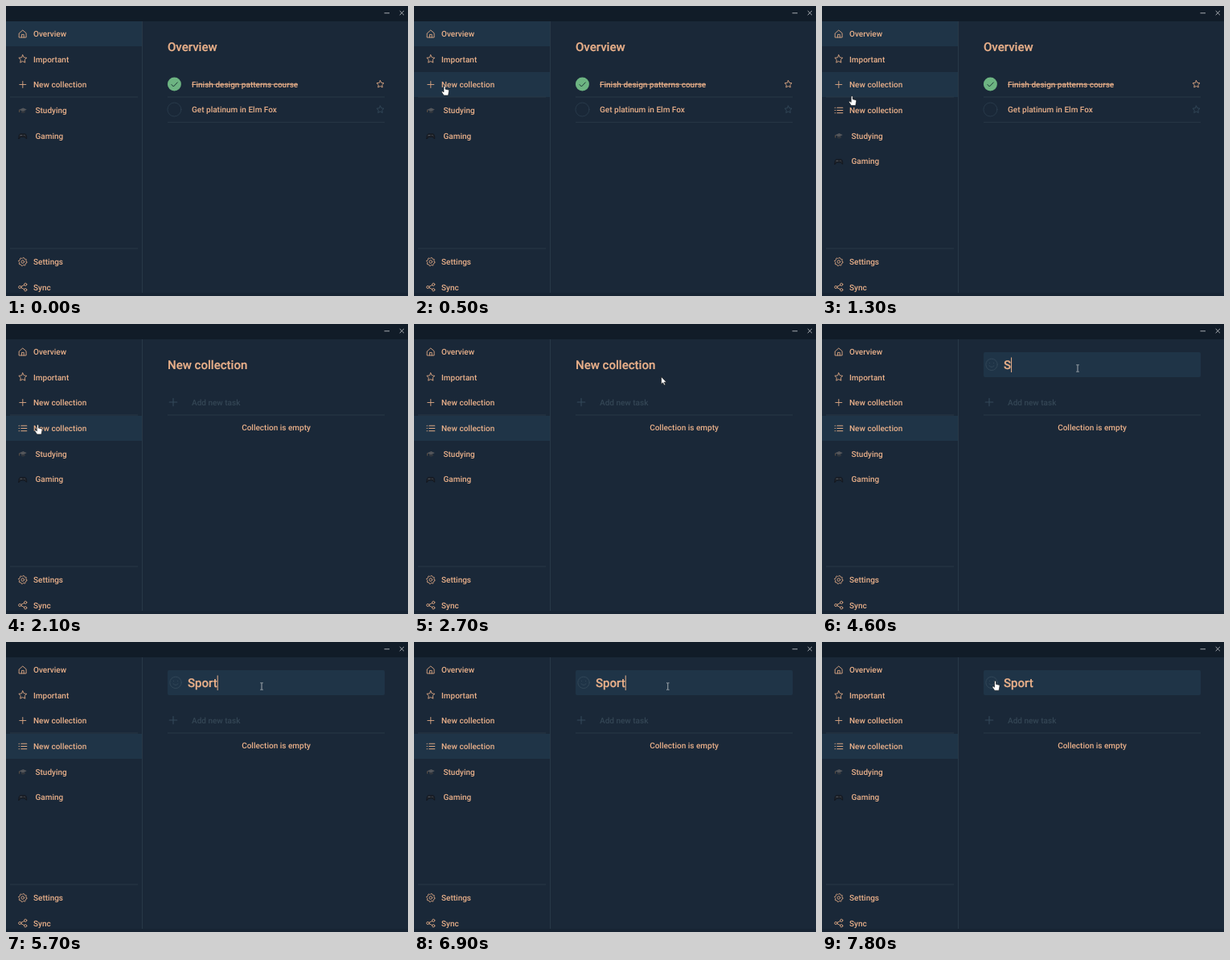
An HTML page for the animation above (8000 ms loop, 500x360 px).

```html
<!DOCTYPE html>
<html lang="en">
<head>
<meta charset="utf-8">
<title>Task collections</title>
<style>
  html, body { margin: 0; width: 100%; height: 100%; overflow: hidden; background: #1a2838; }
  svg { display: block; width: 100%; height: 100%; }
  text { font: 500 10px Roboto, sans-serif; fill: #e9b08a; white-space: pre; text-rendering: geometricPrecision; }
  .title { font-size: 15px; stroke: #e9b08a; stroke-width: .2; }
  .dim { fill: #344655; }
  .icon { fill: none; stroke: #dda884; stroke-width: .9; stroke-linejoin: round; stroke-linecap: round; }
  .faint { stroke: #34495a; }
  .rule { stroke: #283847; stroke-width: 1; }
  .row { fill: #1f3447; }
</style>
</head>
<body>
<svg id="stage" viewBox="0 0 500 360"></svg>
<script>
const LOOP = 8000;
const stage = document.getElementById('stage');
const get = id => document.getElementById(id);

// Closed outline through points whose radius depends on their index.
function radialPath(count, turn, radius) {
  const points = Array.from({ length: count }, (_, i) => {
    const a = turn + i * 2 * Math.PI / count, r = radius(i);
    return `${(r * Math.cos(a)).toFixed(2)} ${(r * Math.sin(a)).toFixed(2)}`;
  });
  return `M${points.join('L')}Z`;
}
const starPath = r => radialPath(10, -Math.PI / 2, i => i % 2 ? r * 0.5 : r);
const gearPath = radialPath(32, Math.PI / 32, i => i % 4 < 2 ? 5.2 : 4.2);

// Icons are drawn around their own centre.
const icons = {
  home: '<path d="M-4.3-.8L0-4.5 4.3-.8V4.5H-4.3ZM-1.4 4.5V.9H1.4V4.5"/>',
  star: `<path d="${starPath(5.2)}"/>`,
  smallStar: `<path d="${starPath(4.7)}"/>`,
  plus: '<path d="M-4 0H4M0-4V4"/>',
  list: '<path d="M-2-3.3H5M-2 0H5M-2 3.3H5M-4.7-3.3H-4.3M-4.7 0H-4.3M-4.7 3.3H-4.3" stroke-width="1.1"/>',
  gear: `<path d="${gearPath}"/><circle r="1.8"/>`,
  share: '<circle cx="-3.5" r="1.6"/><circle cx="3.4" cy="-3.3" r="1.6"/><circle cx="3.4" cy="3.3" r="1.6"/><path d="M-2-.7L1.9-2.6M-2 .7L1.9 2.6"/>',
  smile: '<circle r="7.2"/><path d="M-3 1.5Q0 5 3 1.5M-2.5-2V-1.6M2.5-2V-1.6"/>',
  cap: '<g stroke="none"><path d="M-4.5-.8L.5-3 5-1 .3 1.5Z" fill="#54565a"/><path d="M-2 .7V2.7Q.5 4.2 3 2.5V.4L.3 1.7Z" fill="#33373d"/><path d="M-4.2-.3V2" stroke="#80664c" stroke-width=".7"/></g>',
  pad: '<path d="M-5 3.6Q-5-2.2-2.5-2.2H2.5Q5-2.2 5 3.6Q3.6 3.7 2.5 1.5H-2.5Q-3.6 3.7-5 3.6Z" fill="#20242b" stroke="#10141b" stroke-width=".7"/><path d="M-3-.4H-1M2-.4H2.2" stroke="#62656b" stroke-width=".8"/>'
};

const icon = (name, x, y, style = '') =>
  `<g class="icon ${style}" transform="translate(${x} ${y})">${icons[name]}</g>`;
const label = (text, x, y, attrs = '') => `<text x="${x}" y="${y + 3.6}" ${attrs}>${text}</text>`;
const rule = (x1, x2, y) => `<path class="rule" d="M${x1} ${y}H${x2}"/>`;
const item = (name, text, y, x = 34) => icon(name, 20.8, y) + label(text, x, y);
const row = (id, y) => `<rect id="${id}" class="row" y="${y}" width="169" height="31"/>`;

stage.innerHTML = `
  <rect width="500" height="360" fill="#1a2838"/>
  <rect width="500" height="19" fill="#111c28"/>
  <rect y="356" width="500" height="4" fill="#111c28" opacity=".3"/>
  <path d="M470.5 8.8H477M489.7 6l5.2 5.2M494.9 6l-5.2 5.2" stroke="#b9bdc1" stroke-width=".9" fill="none"/>
  ${row('overviewRow', 19)}${row('hoverRow', 82)}${row('newRow', 114)}
  <path class="rule" d="M169.5 19V356"/>
  ${rule(5, 164, 113)}${rule(5, 164, 301)}
  ${item('home', 'Overview', 34.5)}
  ${item('star', 'Important', 66)}
  ${item('plus', 'New collection', 97.5)}
  <g id="newItem">${item('list', 'New collection', 129.5)}</g>
  <g id="oldItems">
    ${item('cap', 'Studying', 129.5, 36.5)}
    ${item('pad', 'Gaming', 161, 36.5)}
  </g>
  ${item('gear', 'Settings', 317.5)}
  ${item('share', 'Sync', 349)}
  <g id="overview">
    <text class="title" x="201" y="55.7">Overview</text>
    <circle cx="209.4" cy="97" r="8.5" fill="#6db482"/>
    <path d="M205.6 97.2l2.7 2.8 5.2-5.4" fill="none" stroke="#1d3a38"/>
    ${label('Finish design patterns course', 231, 97)}
    <path d="M231 97.3H363" stroke="#dda884" stroke-width=".9"/>
    ${icon('smallStar', 465.5, 97.2)}
    <circle cx="209.4" cy="128.5" r="8.5" class="icon faint" opacity=".6"/>
    ${label('Get platinum in Elm Fox', 231, 128.5)}
    ${icon('smallStar', 465.5, 128.7, 'faint')}
    ${rule(201, 471, 113)}${rule(201, 471, 144.3)}
  </g>
  <g id="collection">
    <rect id="field" class="row" x="201" y="35" width="270" height="31" rx="2"/>
    <g id="smile">${icon('smile', 211, 50.3, 'faint')}</g>
    <rect id="selection" x="226" y="41" height="19" fill="#0078d7"/>
    <text id="name" class="title" y="55.7"></text>
    <path id="caret" d="M0 41.5V60" stroke="#e9b08a"/>
    <g transform="translate(208 97) scale(1.2)"><g class="icon faint">${icons.plus}</g></g>
    ${label('Add new task', 231, 97, 'class="dim"')}
    ${rule(201, 471, 113)}
    ${label('Collection is empty', 336, 128.5, 'text-anchor="middle"')}
  </g>
  <g id="pointer">
    <path id="arrow" d="M0 0V9.2L2.1 7.3 3.6 10.5 5.1 9.8 3.6 6.7H6.5Z" fill="#fff" stroke="#111" stroke-width=".6"/>
    <path id="hand" d="M-1 .8Q0-.6 1 .8V4.2L4.8 5.1Q5.7 5.5 5.5 6.6L4.6 12H-.8L-3.7 7.8Q-3.4 6.4-2.1 7L-1 8Z" fill="#fff" stroke="#111" stroke-width=".6"/>
    <path id="beam" d="M-1.7-4.2H-.5L0-3.8.5-4.2H1.7M0-3.8V3.8M-1.7 4.2H-.5L0 3.8.5 4.2H1.7" fill="none" stroke="#b4b9bd" stroke-width=".9"/>
  </g>`;

// time, x, y, cursor shape from then on
const path = [
  [100, 352, 66, 'arrow'], [300, 160, 112, 'hand'], [500, 38, 99, 'hand'],
  [1100, 38, 99, 'hand'], [1300, 37.2, 111.5, 'hand'], [1600, 39, 125, 'hand'],
  [2100, 39, 125, 'hand'], [2300, 130, 112, 'arrow'], [2700, 307.5, 65.5, 'arrow'],
  [2900, 307.5, 65.5, 'beam'], [3100, 319, 55, 'beam'], [4100, 319, 55, 'beam'],
  [4200, 318, 55, 'beam'], [6100, 318, 55, 'beam'], [6400, 316, 55, 'beam'],
  [6900, 316, 55, 'beam'], [7100, 268, 65, 'arrow'], [7300, 222, 54, 'hand'],
  [7400, 215.5, 48.2, 'hand']
];
const typing = [[4600, 'S'], [5000, 'Sp'], [5200, 'Spo'], [5500, 'Spor'], [5700, 'Sport']];

const clamp = v => Math.max(0, Math.min(1, v));
const smooth = v => v * v * (3 - 2 * v);
const show = (id, on) => get(id).setAttribute('display', on ? 'inline' : 'none');

function drawPointer(t) {
  const i = path.findLastIndex(key => key[0] <= t);
  show('pointer', i >= 0);
  if (i < 0) return;
  const from = path[i], to = path[i + 1] || from;
  const k = clamp((t - from[0]) / (to[0] - from[0] || 1));
  const x = from[1] + (to[1] - from[1]) * k, y = from[2] + (to[2] - from[2]) * k;
  get('pointer').setAttribute('transform', `translate(${x} ${y})`);
  for (const shape of ['arrow', 'hand', 'beam']) show(shape, shape === from[3]);
}

function drawName(t, editing, selected) {
  const typed = typing.findLast(([at]) => at <= t);
  const name = get('name'), x = editing ? 226 : 201;
  name.textContent = typed ? typed[1] : 'New collection';
  name.setAttribute('x', x);
  name.style.fill = name.style.stroke = selected ? '#fff' : '';
  const width = name.getComputedTextLength();
  get('caret').setAttribute('transform', `translate(${x + width + 0.5} 0)`);
  get('selection').setAttribute('width', width);
}

function draw(t) {
  const opened = t >= 2000, editing = t >= 3000, selected = t >= 3700 && t < 4600;
  const insert = smooth(clamp((t - 1000) / 250));

  show('overviewRow', !opened);
  show('hoverRow', t >= 400 && t < 1450);
  show('newRow', opened);
  get('newItem').setAttribute('opacity', insert);
  get('oldItems').setAttribute('transform', `translate(0 ${31.6 * insert})`);

  show('overview', !opened);
  show('collection', opened);
  show('field', editing);
  show('smile', editing);
  show('selection', selected);
  show('caret', editing && !selected && t < 7400);
  if (opened) drawName(t, editing, selected);
  drawPointer(t);
}

const start = performance.now();
function tick() {
  draw((performance.now() - start) % LOOP);
  requestAnimationFrame(tick);
}
tick();
</script>
</body>
</html>
```
